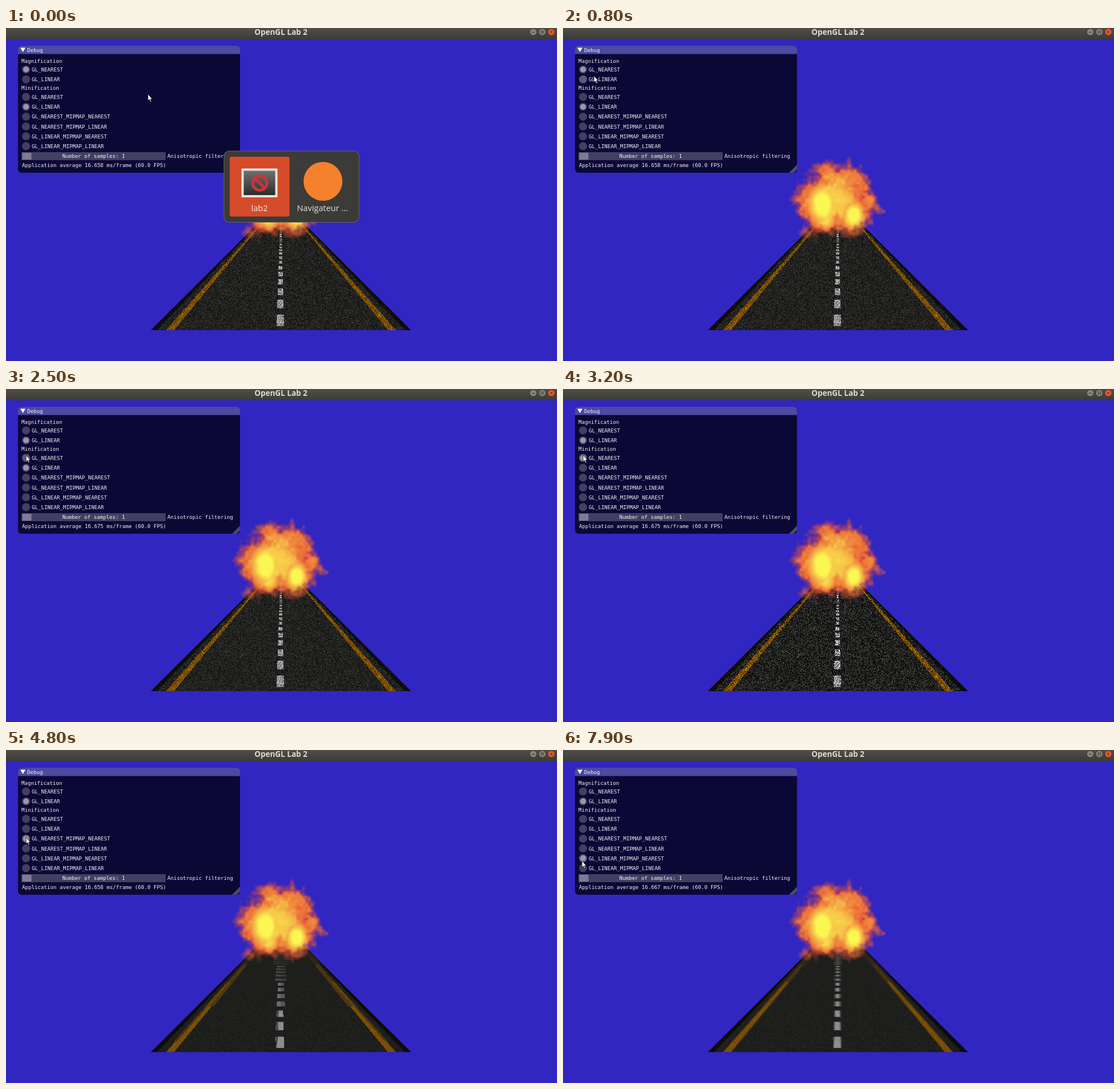
Recreate the animation shown at these times as an HTML page with a canvas. Size 963x582 px, loop 8000 ms.

```html
<!DOCTYPE html>
<html>
<head>
<meta charset="utf-8">
<style>
html, body { margin: 0; height: 100%; overflow: hidden; background: #3126c1; }
canvas { display: block; }
</style>
</head>
<body>
<canvas id="stage" width="963" height="582"></canvas>
<script>
const g = document.getElementById('stage').getContext('2d');
const MONO = '9.1px "DejaVu Sans Mono", monospace';
const clamp = (v, a = 0, b = 1) => Math.min(b, Math.max(a, v));
const mix = (a, b, k) => a + (b - a) * k;
const mixAll = (a, b, k) => a.map((v, i) => mix(v, b[i], k));

function hash(x, y) {
  let n = Math.imul(x, 374761393) ^ Math.imul(y, 668265263);
  n = Math.imul(n ^ (n >>> 13), 1274126177);
  return ((n ^ (n >>> 16)) >>> 0) / 4294967296;
}

function noise(x, y) {
  const i = Math.floor(x), j = Math.floor(y);
  const ease = v => v * v * (3 - 2 * v), u = ease(x - i), v = ease(y - j);
  return mix(mix(hash(i, j), hash(i + 1, j), u), mix(hash(i, j + 1), hash(i + 1, j + 1), u), v);
}

const cloud = (x, y) => noise(x / 20, y / 20) * .5 + noise(x / 10, y / 10) * .3 + noise(x / 5, y / 5) * .2;

// Renders shade(x, y) -> [r, g, b, alpha] once into an offscreen layer.
function layer(x, y, w, h, shade) {
  const c = document.createElement('canvas');
  c.width = w; c.height = h;
  const k = c.getContext('2d'), img = k.createImageData(w, h);
  for (let j = 0; j < h; j++) for (let i = 0; i < w; i++) {
    const [r, gr, b, a] = shade(x + i, y + j);
    img.data.set([r, gr, b, a * 255], (j * w + i) * 4);
  }
  k.putImageData(img, 0, 0);
  return () => g.drawImage(c, x, y);
}

// Coverage of a stripe of given half width, filtered by a texel of given size.
const cover = (dist, half, size) => clamp((half + size / 2 - dist) / size);
const PERIOD = .000748;

function lines(u, depth, level, blocky) {
  const size = .05 * 2 ** (level - 1), along = .0001 * 2 ** (level - 1);
  if (blocky) u = (Math.floor(u / size) + .5) * size;
  const phase = ((depth - .00456) % PERIOD + PERIOD) % PERIOD;
  const yellow = cover(Math.abs(Math.abs(u) - .856), .031, size) * Math.min(1, .062 / size);
  const white = cover(Math.abs(u + .005), .03, size) * cover(Math.abs(phase - .000225), .000225, along);
  return [yellow, white];
}

function road({ mip, blocky, rough }) {
  return layer(250, 340, 462, 188, (x, y) => {
    const d = y + .5 - 301.5, u = (x + .5 - 480.5) / d;
    const alpha = clamp((1.004 - Math.abs(u)) * d + .5);
    if (!alpha) return [0, 0, 0, 0];
    const lod = 2 * Math.log2(207 / d) - (mip === 'smooth' ? .5 : 0);
    const level = mip ? Math.max(-2, Math.floor(lod)) : -3;
    let marks = lines(u, 1 / d, level, blocky);
    if (mip === 'smooth' && lod > -2)
      marks = mixAll(marks, lines(u, 1 / d, level + 1, blocky), lod - level);
    const r = mip ? mix(hash(x >> 1, y), hash(x, y), .4) : hash(x, y);
    let base, paint;
    if (mip) {
      base = 30 + (r - .5) * 22 * Math.min(1, d / 200);
      paint = .5 + .18 * r;
    } else {
      base = rough ? 9 + 95 * r ** 3 : 16 + 52 * r * r;
      paint = rough ? .1 + r : .25 + .7 * r;
    }
    if (Math.abs(u) > .955) base *= .4;
    let c = mixAll([base, base, base - 1], [205 * paint, 132 * paint, 8 * paint], marks[0]);
    c = mixAll(c, Array(3).fill(240 * paint), marks[1]);
    return [...c, alpha];
  });
}

const roads = [
  { rough: true }, {},
  { mip: 'hard', blocky: true }, { mip: 'smooth', blocky: true }, { mip: 'hard' }
].map(road);

// A ragged disc with a notch at the bottom and two bright cores.
const fire = layer(380, 210, 190, 190, (x, y) => {
  const n = cloud(x, y) - .5, dx = x - 476, dy = y - 305;
  const radius = 76 - 22 * Math.exp(-(((Math.atan2(dy, dx) - 1.5) / .3) ** 2));
  const inside = radius - Math.hypot(dx, dy) + n * 42;
  const core = (cx, cy, w, h) => 1.55 - Math.hypot((x - cx) / w, (y - cy) / h);
  const glow = Math.max(core(453, 307, 22, 32), core(507, 326, 17, 22));
  const heat = clamp(Math.max(.72 * clamp((inside - 8) / 42), glow) + n * .3);
  const alpha = clamp(inside / 20) * mix(1, .55, clamp((y - 350) / 25));
  return [...mixAll([232, 76, 50], [252, 246, 82], heat), alpha];
});

function text(s, x, y, font = MONO, color = '#f2f2f5', align = 'left') {
  g.font = font; g.fillStyle = color; g.textAlign = align;
  g.fillText(s, x, y);
}
function box(x, y, w, h, color, radius = 0) {
  g.fillStyle = color;
  g.beginPath(); g.roundRect(x, y, w, h, radius); g.fill();
}
function disc(x, y, r, color) {
  g.fillStyle = color;
  g.beginPath(); g.arc(x, y, r, 0, 7); g.fill();
}
function shape(d, color) {
  g.fillStyle = color;
  g.fill(new Path2D(d));
}
function stroke(color, width, d) {
  g.strokeStyle = color; g.lineWidth = width;
  g.stroke(new Path2D(d));
}
function gradient(y0, y1, a, b) {
  const f = g.createLinearGradient(0, y0, 0, y1);
  f.addColorStop(0, a); f.addColorStop(1, b);
  return f;
}

const kinds = ['NEAREST', 'LINEAR'];
const mipmaps = kinds.flatMap(a => kinds.map(b => `${a}_MIPMAP_${b}`));
const ROW = 17.2, MAG_Y = 72.5, MIN_Y = 120.5;
const radios = [
  ...kinds.map((name, i) => ({ name, y: MAG_Y + i * ROW })),
  ...[...kinds, ...mipmaps].map((name, i) => ({ name, y: MIN_Y + i * ROW }))
];

// Pointer moves: start and end in ms, then the place reached.
const moves = [[300, 800, 53.5, 83], [900, 1200, 34.5, 85], [1900, 2500, 34.5, 115], [3400, 3800, 34.5, 162],
  [4000, 4300, 34.5, 152], [5000, 5700, 34.5, 172], [6500, 7300, 34.5, 190], [7700, 7900, 32.5, 193]];
const MAG_CLICK = 1800;
// Click time and the minification filter it selects.
const clicks = [[0, 1], [2800, 0], [4600, 2], [6100, 3], [7500, 4]];

const pointerAt = t => moves.reduce(
  (p, [start, end, ...to]) => mixAll(p, to, clamp((t - start) / (end - start))), [247.5, 115]);

// The frame time wobbles around 60 Hz and settles.
const frameTime = t =>
  1000 / 60 - .0085 * Math.round((1.1 - t / 12000) * Math.cos(2 * Math.PI * t / 5200));

function titleBar() {
  box(0, 0, 963, 19.5, gradient(0, 20, '#504e47', '#3c3b37'));
  text('OpenGL Lab 2', 480.5, 12, 'bold 13.5px "Open Sans", sans-serif', '#dfdbd2', 'center');
  const icons = ['M-2.5 .5h5', 'M-2-2h4v4h-4z', 'M-2-2l4 4M2-2l-4 4'];
  icons.forEach((icon, i) => {
    g.save();
    g.translate(921.5 + i * 15.8, 7);
    disc(0, 0, 6.5, '#35342f');
    disc(0, 0, 5.8, i === 2 ? '#e9552b' : '#85837a');
    stroke('#3a3934', 1, icon);
    g.restore();
  });
}

function panel(t, px, py, filter) {
  box(21, 31, 388, 222, '#0c0836', 6);
  box(21, 31, 388, 14.5, '#4d4aa0', [6, 6, 0, 0]);
  shape('M25 34.5h9l-4.5 7.5z', '#fff');
  text('Debug', 37, 42);
  text('Magnification', 27, 60.5);
  text('Minification', 27, 108);
  const chosen = [t < MAG_CLICK ? 0 : 1, 2 + filter];
  radios.forEach(({ name, y }, i) => {
    const hover = px < 183 && Math.abs(py - y) <= 7.5;
    disc(35, y, 7, hover ? '#5c5878' : '#424062');
    if (chosen.includes(i)) disc(35, y, 5, '#9a98ab');
    text('GL_' + name, 45, y + 3.5);
  });
  box(27, 217, 252, 14, '#424062');
  box(28.5, 218, 16, 12, '#7d7b96');
  text('Number of samples: 1', 98.5, 227);
  text('Anisotropic filtering', 282, 227);
  const ms = frameTime(t);
  text(`Application average ${ms.toFixed(3)} ms/frame (${(1000 / ms).toFixed(1)} FPS)`, 28, 243);
  shape('M409 239v8l-6 6h-8z', '#4c4a6a');
}

function switcher(alpha) {
  const label = '14.5px "Open Sans", sans-serif';
  g.globalAlpha = alpha;
  box(380.5, 214.5, 237, 125.5, '#67665f', 9.5);
  box(381.5, 215.5, 235, 123.5, '#3c3b37', 8.5);
  box(391, 225, 104.5, 104.5, '#d64b29', 3);
  box(411.5, 245.5, 63, 50.5, '#e6e4e0', 1);
  box(415.5, 249.5, 55, 42.5, gradient(249, 292, '#707070', '#2c2c2c'));
  stroke('#c8353a', 5, 'M431 271a12.5 12.5 0 1 1 25 0a12.5 12.5 0 1 1-25 0M435 262.5l17 17');
  disc(554, 268, 34, '#f5812c');
  text('lab2', 443, 320, label, '#f2efe9', 'center');
  text('Navigateur …', 553, 320, label, '#e4e1da', 'center');
  g.globalAlpha = 1;
}

function pointer(x, y) {
  const arrow = 'M.5.5v11.5l2.5-2.2 2 4.2 1.8-.8-1.9-4 3.3-.2z';
  g.save();
  g.translate(x, y);
  shape(arrow, '#f4f4f4');
  stroke('#111', .8, arrow);
  g.restore();
}

function draw(now) {
  const t = Math.floor(now % 8000 / 100) * 100, [x, y] = pointerAt(t);
  const filter = clicks.findLast(([at]) => at <= t)[1];
  box(0, 0, 963, 582, '#3126c1');
  roads[filter]();
  fire();
  titleBar();
  panel(t, x, y, filter);
  if (t < 200) switcher(t < 100 ? 1 : .5);
  pointer(x, y);
  requestAnimationFrame(draw);
}
requestAnimationFrame(draw);
</script>
</body>
</html>
```
